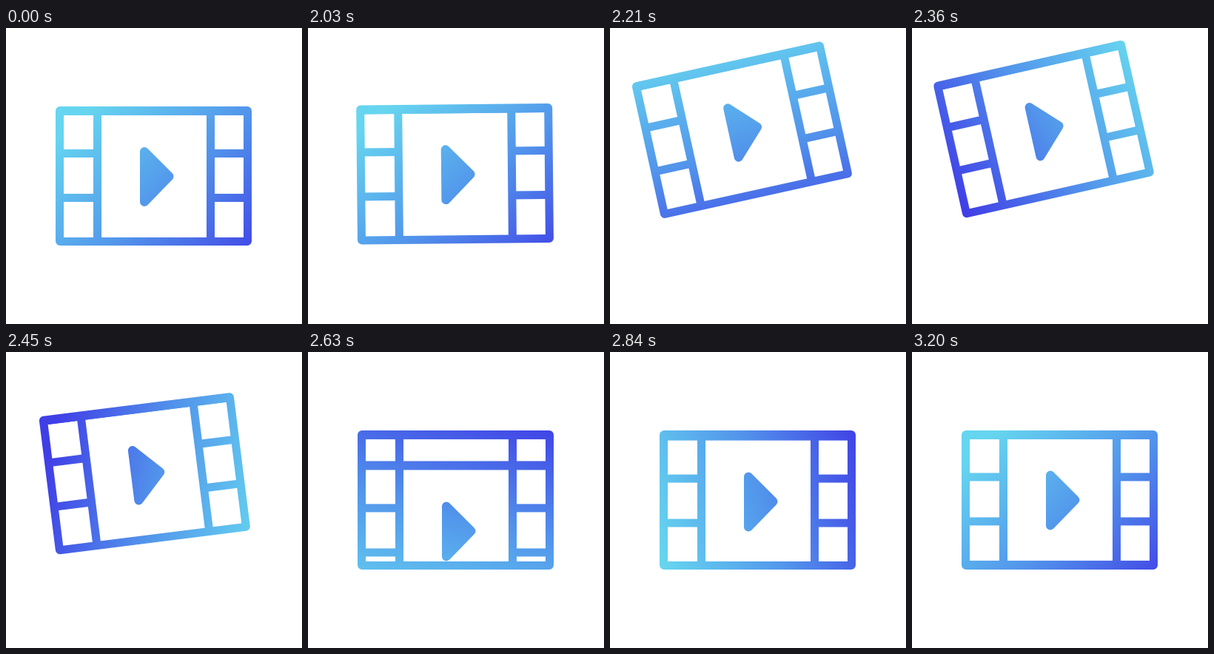
An HTML page with a canvas that plays this animation: 400x400 px, repeating every 3.29 s.

```html
<!DOCTYPE html>
<html>
<head>
<meta charset="utf-8">
<style>
  html, body { margin: 0; height: 100%; overflow: hidden; background: #fff; }
  canvas { display: block; }
</style>
</head>
<body>
<canvas id="stage" width="400" height="400"></canvas>
<script>
const ctx = document.getElementById('stage').getContext('2d');
const LOOP = 3290, STEP = 30, PITCH = 176.5;
const CENTER = { x: 199.5, y: 200 };

const rad = degrees => degrees * Math.PI / 180;
const clamp = x => Math.max(0, Math.min(1, x));
const linear = x => x;
const smooth = x => x * x * (3 - 2 * x);

// Sum of eased moves between [time, value] key points
function follow(keys, t, ease) {
  return keys.slice(1).reduce((sum, [t1, v1], i) => {
    const [t0, v0] = keys[i];
    return sum + (v1 - v0) * ease(clamp((t - t0) / (t1 - t0)));
  }, keys[0][1]);
}

// Rise, hold and fall are symmetric around one moment
const lift = t => smooth(clamp((289 - Math.abs(t - 2289)) / 240));

// The strip rolls on by one frame, overshoots and settles
const roll = t => follow([[2560, 0], [2785, 180], [2930, 174], [3320, PITCH]], t, smooth);

// One full turn, fastest in the middle
const turn = t => follow([[2000, 45], [2210, 88], [2630, 285], [3080, 405]], t, linear);

// The gradient turns around a point slightly below and right of the center
function makeGradient(t) {
  const x = CENTER.x + 15, y = CENTER.y + 25;
  const dx = 155 * Math.cos(rad(turn(t))), dy = 155 * Math.sin(rad(turn(t)));
  const gradient = ctx.createLinearGradient(x - dx, y - dy, x + dx, y + dy);
  ['#66d5ef', '#5295eb', '#403fe6'].forEach((color, i) => gradient.addColorStop(i / 2, color));
  return gradient;
}

// One film frame: top divider, perforation dividers, play symbol
function drawFilmFrame(y) {
  ctx.fillRect(72, y + 106, 255, 12);
  for (const x of [72, 276]) {
    ctx.fillRect(x, y + 164, 51, 11);
    ctx.fillRect(x, y + 224, 51, 11);
  }
  ctx.beginPath();
  ctx.moveTo(187, y + 167);
  ctx.lineTo(187, y + 235);
  ctx.lineTo(220.5, y + 200.5);
  ctx.closePath();
  ctx.lineWidth = 12;
  ctx.lineJoin = 'round';
  ctx.fill();
  ctx.stroke();
}

function drawStrip(offset) {
  ctx.save();
  ctx.beginPath();
  ctx.rect(75, 112, 249, 176);
  ctx.clip();
  drawFilmFrame(offset);
  drawFilmFrame(offset - PITCH);
  ctx.restore();
}

function drawBorder() {
  ctx.fillRect(118, 112, 11, 176);
  ctx.fillRect(271, 112, 11, 176);
  ctx.beginPath();
  ctx.roundRect(67, 106, 265, 188, 6);
  ctx.rect(78, 118, 243, 165);
  ctx.fill('evenodd');
}

function draw(t) {
  const p = lift(t);
  ctx.clearRect(0, 0, 400, 400);
  ctx.save();
  ctx.translate(CENTER.x - 22 * p, CENTER.y - 65 * p);
  ctx.rotate(rad(-13 * p));
  ctx.translate(-CENTER.x, -CENTER.y);
  ctx.fillStyle = ctx.strokeStyle = makeGradient(t);
  drawStrip(roll(t) % PITCH);
  drawBorder();
  ctx.restore();
}

function tick() {
  const t = performance.now() % LOOP;
  draw(Math.min(3200, Math.floor((t + 10) / STEP) * STEP - 10));
  requestAnimationFrame(tick);
}
tick();
</script>
</body>
</html>
```
